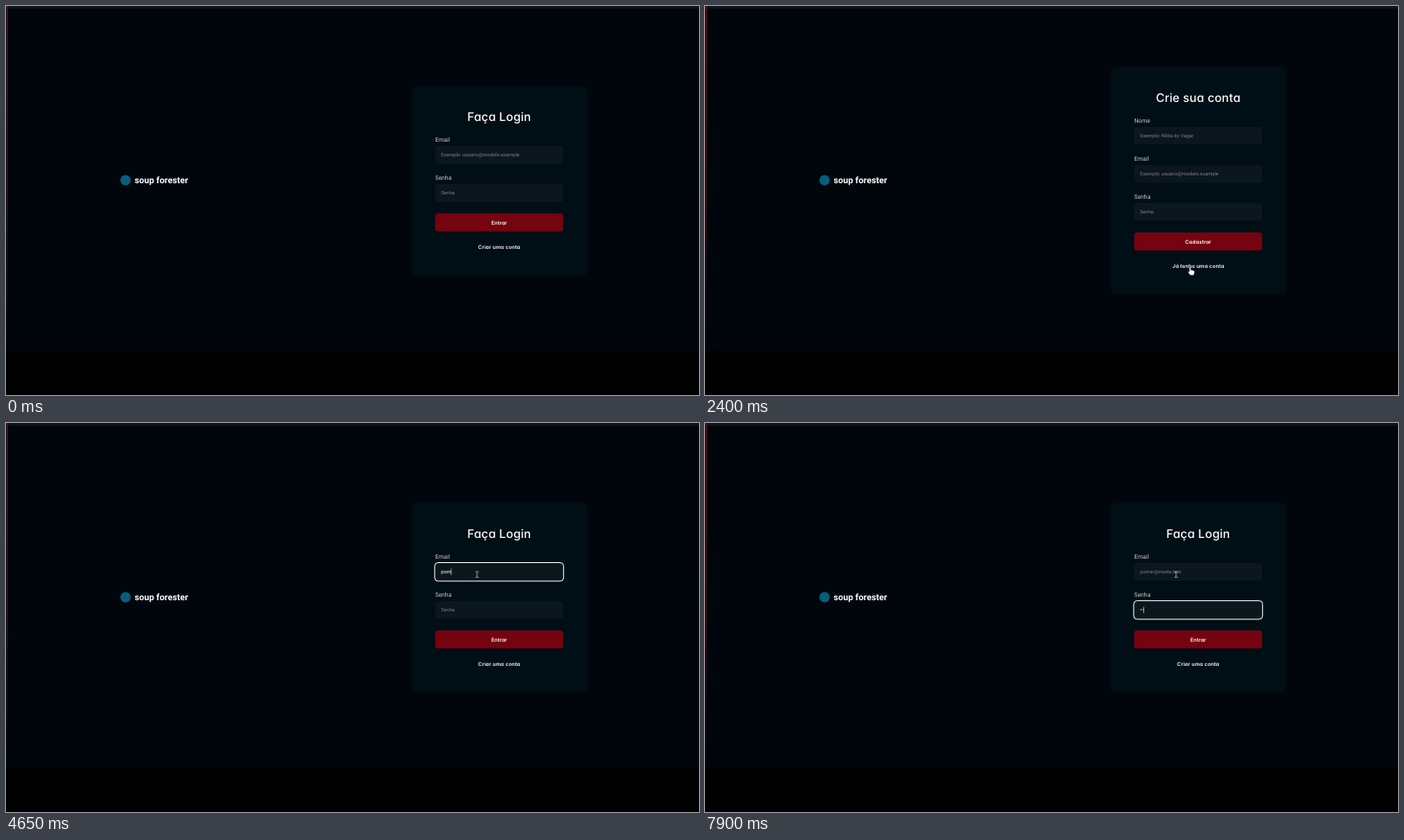
An HTML page that plays this animation: 800x450 px, repeating every 8 s.

```html
<!DOCTYPE html>
<html lang="pt-BR">
<head>
<meta charset="utf-8">
<title>Login</title>
<style>
  html, body { margin: 0; width: 100%; height: 100%; overflow: hidden; background: #000; }
  svg { display: block; width: 800px; height: 450px; }
  text { font-family: Roboto, "Open Sans", sans-serif; text-rendering: geometricPrecision; white-space: pre; }
  .brand { font-size: 10.25px; font-weight: 700; fill: #fff; }
  .label { font-size: 6.85px; fill: #c8cbd0; }
  .value { font-size: 5.7px; }
  .title, .action {
    font-family: Inter, "Open Sans", sans-serif; font-feature-settings: "cv11";
    fill: #fff; text-anchor: middle;
  }
  .title { font-size: 13.7px; font-weight: 500; letter-spacing: .15px; }
  .action { font-size: 6.05px; font-weight: 600; letter-spacing: .08px; }
</style>
</head>
<body>
<svg id="stage" viewBox="0 0 800 450">
  <defs>
    <linearGradient id="edge" x1="0" y1="0" x2="0" y2="1">
      <stop offset="0" stop-color="#6e1020"/>
      <stop offset=".55" stop-color="#520b18"/>
      <stop offset="1" stop-color="#520b18" stop-opacity="0"/>
    </linearGradient>
  </defs>
  <rect width="800" height="450" fill="#000"/>
  <rect width="800" height="399" fill="#00070c"/>
  <rect width="800" height="3.2" fill="#13111b"/>
  <rect x=".8" width="1.2" height="390" fill="url(#edge)"/>
</svg>
<script>
const LOOP = 8000, FADE = 1000;
const REGISTER_AT = 1250, LOGIN_AT = 2830;
const EMAIL_FOCUS = 3900, PASSWORD_FOCUS = 7300;
const EMAIL = 'pomar@moda.test';
const EMAIL_KEYS = [4200, 4400, 4600, 4750, 4900, 5300, 5600, 6030, 6150, 6280, 6450, 6650, 6780, 6920, 7060];
const PASSWORD_KEYS = [7600, 7830];
const MUTED = '#7c7c8a';

const stage = document.getElementById('stage');

function add(parent, tag, attrs, content) {
  const el = document.createElementNS('http://www.w3.org/2000/svg', tag);
  for (const key in attrs) el.setAttribute(key, attrs[key]);
  if (content) el.textContent = content;
  parent.appendChild(el);
  return el;
}

const show = (el, on) => el.setAttribute('visibility', on ? 'visible' : 'hidden');

function addField(page, y, label, hint) {
  add(page, 'text', { class: 'label', x: 495.4, y: y - 5 }, label);
  add(page, 'rect', { x: 495.4, y, width: 147.8, height: 20.4, rx: 3.3, fill: '#0b171d' });
  const ring = add(page, 'rect', {
    x: 494.9, y: y - .5, width: 148.8, height: 21.4, rx: 3.9,
    fill: 'none', stroke: '#fff', 'stroke-width': 1
  });
  const text = add(page, 'text', { class: 'value', x: 502.2, y: y + 12.1, fill: MUTED }, hint);
  const caret = add(page, 'rect', { y: y + 6.6, width: .6, height: 7, fill: '#fff' });

  function update(value, focused) {
    text.textContent = value || hint;
    text.setAttribute('fill', value && focused ? '#fff' : MUTED);
    caret.setAttribute('x', 502.2 + (value ? text.getComputedTextLength() : 0));
    ring.style.display = caret.style.display = focused ? '' : 'none';
  }
  update('', false);
  return update;
}

function addPage(top, title, fields, button, link) {
  const page = add(stage, 'g', {});
  const end = top + 70 + fields.length * 44.1;
  add(page, 'rect', { x: 468.4, y: top, width: 202.6, height: end - top + 61, rx: 6, fill: '#000e15' });
  add(page, 'circle', { cx: 138, cy: 201.6, r: 6, fill: '#065e7c' });
  add(page, 'text', { class: 'brand', x: 148.4, y: 205.2 }, 'soup forester');
  add(page, 'text', { class: 'title', x: 569.4, y: top + 40.8 }, title);
  const updates = fields.map(([label, hint], i) => addField(page, top + 69.6 + i * 44.1, label, hint));
  const y = top + 59.4 + fields.length * 44.1;
  add(page, 'rect', { x: 495.4, y, width: 147.8, height: 20.8, rx: 3.3, fill: '#750310' });
  add(page, 'text', { class: 'action', x: 569.4, y: y + 12.6 }, button);
  add(page, 'text', { class: 'action', x: 569.4, y: y + 41.4 }, link);
  return { page, updates };
}

const emailField = ['Email', 'Exemplo: usuario@modelo.example'];
const passwordField = ['Senha', 'Senha'];
const login = addPage(92.4, 'Faça Login', [emailField, passwordField], 'Entrar', 'Criar uma conta');
const register = addPage(70.3, 'Crie sua conta',
  [['Nome', 'Exemplo: Nilda do Vagar'], emailField, passwordField], 'Cadastrar', 'Já tenho uma conta');

// Pointer shapes, each drawn around its hot spot
const outline = { fill: '#fff', stroke: '#05090c', 'stroke-width': .5, 'stroke-linejoin': 'round' };
const pointers = {
  hand: add(stage, 'path', {
    ...outline,
    d: 'M-.9 .9a.9.9 0 0 1 1.8 0V4l3 .6q1.4.3 1.3 1.7l-.6 3q-.2.9-1 .9H.7q-.7 0-1.1-.7L-2.4 6.7q-.4-.9.4-1.1.5-.1 1.1.6z'
  }),
  arrow: add(stage, 'path', { ...outline, d: 'M0 0V8L1.9 6.3 3.1 9 4.3 8.5 3.1 5.8H5.7z' }),
  beam: add(stage, 'path', {
    fill: 'none', stroke: '#c4c8cb', 'stroke-width': .75,
    d: 'M-2 -3.3H-.6L0 -2.8 .6 -3.3H2M0 -2.8V2.8M-2 3.3H-.6L0 2.8 .6 3.3H2'
  })
};

// time, x, y, shape until the next point
const path = [
  [1100, 572, 270, 'arrow'],
  [1220, 562, 277.8, 'hand'],
  [2000, 562, 277.8, 'hand'],
  [2080, 562, 283, 'arrow'],
  [2220, 560.5, 297, 'hand'],
  [2320, 560, 301.3, 'hand'],
  [2900, 560, 301.3, 'hand'],
  [3100, 567.2, 273.2, 'hand'],
  [3200, 567, 262, 'hand'],
  [3360, 561, 239, 'arrow'],
  [3450, 556, 226, 'beam'],
  [3570, 549, 206, 'arrow'],
  [3680, 545, 182, 'beam'],
  [3800, 543.8, 175.3, 'beam']
];

function drawPointer(t) {
  const i = path.findLastIndex(point => point[0] <= t);
  const from = path[i], to = path[i + 1] || from;
  for (const name in pointers) show(pointers[name], from && name === from[3]);
  if (!from) return;
  const p = to === from ? 0 : (t - from[0]) / (to[0] - from[0]);
  const x = from[1] + (to[1] - from[1]) * p;
  const y = from[2] + (to[2] - from[2]) * p;
  pointers[from[3]].setAttribute('transform', `translate(${x} ${y})`);
}

const typed = (keys, t) => keys.filter(k => k <= t).length;

function fadeIn(t, start) {
  const p = Math.min(1, Math.max(0, (t - start) / FADE));
  return 1 - (1 - p) ** 2;
}

function draw(t) {
  const registering = t >= REGISTER_AT && t < LOGIN_AT;
  login.page.style.display = registering ? 'none' : '';
  register.page.style.display = registering ? '' : 'none';
  login.page.setAttribute('opacity', t < REGISTER_AT ? 1 : fadeIn(t, LOGIN_AT));
  register.page.setAttribute('opacity', fadeIn(t, REGISTER_AT));
  if (!registering) {
    const [email, password] = login.updates;
    email(EMAIL.slice(0, typed(EMAIL_KEYS, t)), t >= EMAIL_FOCUS && t < PASSWORD_FOCUS);
    password('•'.repeat(typed(PASSWORD_KEYS, t)), t >= PASSWORD_FOCUS);
  }
  drawPointer(t);
}

const begin = performance.now();
function frame() {
  draw((performance.now() - begin) % LOOP);
  requestAnimationFrame(frame);
}
frame();
</script>
</body>
</html>
```
